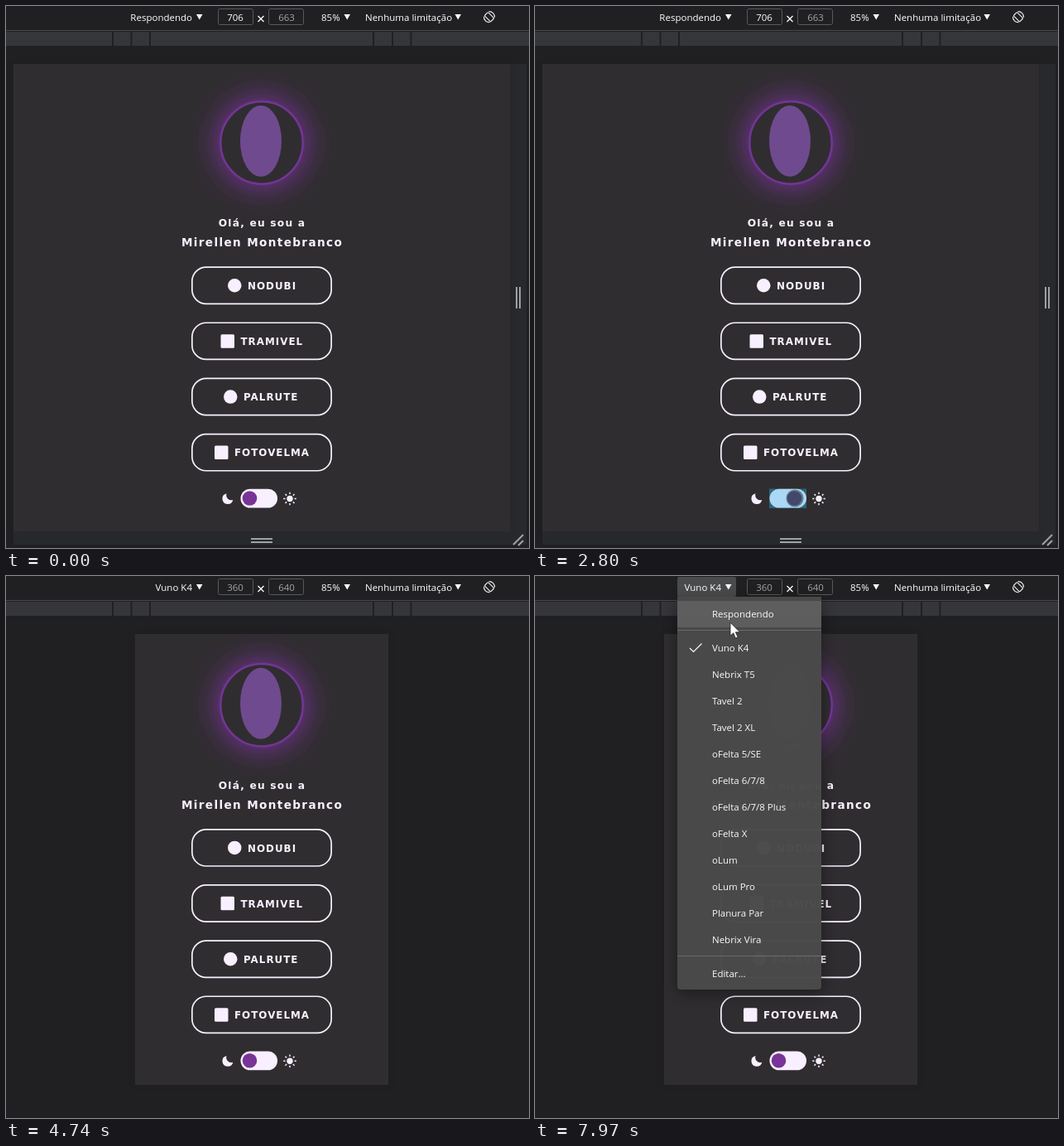
Write an HTML page that moves like this. It is 632 px wide and 654 px high and loops after 8 s.

```html
<!DOCTYPE html>
<html lang="pt">
<head>
<meta charset="utf-8">
<style>
  html, body { margin: 0; width: 100%; height: 100%; overflow: hidden; background: #202022; }
  svg { display: block; width: 100%; height: 100%; }
  .ui { font: 11.5px "Open Sans", sans-serif; fill: #fff; }
  .page { font: bold 12px "DejaVu Sans", sans-serif; fill: currentColor; }
  .mid { text-anchor: middle; }
  .field { fill: #202022; stroke: #58595c; }
  .grip { stroke: #a0a1a3; stroke-width: 2; fill: none; }
  #menuBox { filter: drop-shadow(0 5px 9px rgba(0, 0, 0, .4)); }
</style>
</head>
<body>
<svg viewBox="0 0 632 654">
  <defs>
    <filter id="blur" x="-100%" y="-100%" width="300%" height="300%"><feGaussianBlur stdDeviation="17"/></filter>
    <filter id="soft" x="-30%" y="-30%" width="160%" height="160%"><feGaussianBlur stdDeviation="7"/></filter>
    <clipPath id="view"><rect class="viewport" y="70"/></clipPath>
  </defs>

  <rect width="632" height="654" fill="#202022"/>
  <path d="M0 29.500H632" stroke="#48494c"/>
  <rect y="31" width="632" height="17" fill="#35363a"/>
  <path d="M129 31v17M151.500 31v17M174 31v17M444 31v17M467 31v17M489.500 31v17" stroke="#202022" stroke-width="2"/>

  <g id="resizers">
    <path d="M609 70h20v580H9v-16h600z" fill="#28292c"/>
    <path class="grip" d="M617 339v26M621 339v26M296 643h26M296 647h26M613 650l12-12M619 651l6-6"/>
  </g>
  <rect class="viewport" y="70" fill="#000" opacity=".06" filter="url(#soft)"/>

  <g id="page" clip-path="url(#view)">
    <rect class="viewport" y="70" fill="var(--bg)"/>
    <g id="content">
      <circle cx="309" cy="165" r="53" fill="#7a339e" filter="url(#blur)"/>
      <circle cx="309" cy="165" r="49.700" fill="var(--bg)" stroke="#733596" stroke-width="2.500"/>
      <ellipse cx="308" cy="163" rx="25" ry="43" fill="#6f4a8f"/>
      <text class="page mid" x="309.500" y="266" style="font-size:12.24px;letter-spacing:1.2px">Olá, eu sou a</text>
      <text class="page mid" x="309.500" y="290" style="font-size:13.6px;letter-spacing:1.36px">Mirellen Montebranco</text>
      <g id="links"></g>
      <path d="M266.500 588.200a6.500 6.500 0 1 0 7.800 7.800a6.200 6.200 0 0 1-7.800-7.800z" fill="currentColor"/>
      <circle cx="343" cy="594.500" r="3.700" fill="currentColor"/>
      <g id="rays" stroke="currentColor" stroke-width="1.500"></g>
      <rect x="283.500" y="582.700" width="44.500" height="22.900" rx="11.400" fill="currentColor"/>
      <circle id="knob" cy="594" r="8.800" fill="#783496"/>
      <rect id="tap" x="283" y="582.500" width="45" height="23.500" fill="rgba(51,181,229,.4)"/>
    </g>
  </g>

  <g class="ui">
    <rect id="hover" y="1" height="24" rx="2" fill="#4a4b4d"/>
    <text id="device" x="225" y="18" text-anchor="end"></text>
    <rect class="field" x="256.500" y="3.500" width="42" height="19" rx="2"/>
    <rect class="field" x="317.500" y="3.500" width="42" height="19" rx="2"/>
    <text id="wide" class="mid" x="277" y="18"></text>
    <text id="high" class="mid" x="339" y="18"></text>
    <path d="M304.500 12l7 7M311.500 12l-7 7" stroke="#fff" stroke-width="1.300"/>
    <text x="381" y="18">85%</text>
    <text x="434" y="18">Nenhuma limitação</text>
    <path d="M230 10h7.500l-3.750 6.500zM408.500 10h7.500l-3.750 6.500zM542.500 10h7.500l-3.750 6.500z"/>
    <g fill="none" stroke="#e8eaed" stroke-width="1.200">
      <rect x="581" y="8" width="6" height="10.500" rx="1" transform="rotate(-45 584 13.250)"/>
      <path d="M583.500 6.700a6.500 6.500 0 0 1 7 7M584.500 19.700a6.500 6.500 0 0 1-7-7"/>
    </g>
  </g>

  <g id="menu" class="ui">
    <path id="menuBox" d="M0 25h174v470a4 4 0 0 1-4 4H4a4 4 0 0 1-4-4z" fill="#4a4a4a"/>
    <rect id="row" width="174" height="32" fill="#5f5f5f"/>
    <path d="M0 65.500h174M0 458.500h174" stroke="#6c6c6c"/>
    <path id="check" d="M15 0l4.500 4.500l10-10" fill="none" stroke="#fff" stroke-width="1.200"/>
    <g id="items"></g>
  </g>

  <g id="cursor">
    <circle id="touch" r="10.500" fill="rgba(48,45,48,.55)"/>
    <path id="arrow" d="M0 0v16l3.700-3.400l2.700 6.200l2.700-1.200l-2.700-6h5.200z" fill="#fff" stroke="#222" stroke-width=".8"/>
    <path id="hand" transform="scale(1.1)" d="M-2 1.500q2-3 4 0v7q1.500-1 3 .4q1.800-.8 2.800.8q2.400-.4 2.400 2v5l-2 4.500h-8.500l-5.500-7q0-2.500 2-2l1.800 2z" fill="#fff" stroke="#222" stroke-width=".8"/>
  </g>
</svg>
<script>
const $ = id => document.getElementById(id);
const set = (el, attrs) => { for (const k in attrs) el.setAttribute(k, attrs[k]); };
const show = (el, on) => { el.style.display = on ? '' : 'none'; };

// Buttons: label, label start, round icon
const links = [['NODUBI', 292, true], ['TRAMIVEL', 283.5, false], ['PALRUTE', 287, true], ['FOTOVELMA', 276, false]];
$('links').innerHTML = links.map(([label, x, round], i) => `
  <g transform="translate(0 ${i * 67.15})">
    <rect x="224.850" y="315.100" width="168.300" height="44.200" rx="17" fill="none" stroke="currentColor" stroke-width="1.700"/>
    <rect x="${x - 24}" y="329" width="16.500" height="16.500" rx="${round ? 8.25 : 1.5}" fill="currentColor"/>
    <text class="page" x="${x}" y="342" style="font-size:11.9px;letter-spacing:1px">${label}</text>
  </g>`).join('');

$('rays').innerHTML = Array.from({ length: 8 }, (_, i) =>
  `<path d="M343 589v-2.300" transform="rotate(${i * 45} 343 594.500)"/>`).join('');

const phone = 'Vuno K4';
const devices = [phone, 'Nebrix T5', 'Tavel 2', 'Tavel 2 XL', 'oFelta 5/SE', 'oFelta 6/7/8', 'oFelta 6/7/8 Plus',
  'oFelta X', 'oLum', 'oLum Pro', 'Planura Par', 'Nebrix Vira'];
const item = (label, y) => `<text x="42" y="${y + 4}">${label}</text>`;
$('items').innerHTML = item('Respondendo', 46) + devices.map((d, i) => item(d, 87 + 32 * i)).join('') + item('Editar...', 480);

const LOOP = 8000, PICK = 4560;
// Keyframes: time, then eased values
const pointerPath = [
  [0, 650, 690], [70, 602, 652], [860, 326, 228], [910, 326, 228], [1660, 306, 574], [2060, 306, 588], [2140, 306, 588],
  [2460, 314, 594], [2830, 314, 594], [3450, 205, 16], [3520, 205, 16], [3900, 228, 16], [4050, 228, 16],
  [4260, 233, 59], [4330, 233, 62], [4500, 232, 87], [4580, 232, 87], [4810, 430, 85], [5140, 430, 85],
  [5640, 229, 16], [5810, 229, 18], [6080, 229, 18], [6300, 231, 75], [7250, 231, 75], [7640, 232, 17],
  [7830, 232, 17], [7960, 236, 56], [8000, 236, 57]];
const knobPath = [[0, 294.5], [2110, 294.5], [2400, 313.5], [2800, 313.5], [3090, 294.5]];
const scrollPath = [[0, 0], [6400, 0], [6650, 9], [6950, 9], [7250, 0]];
const menuPath = [[0, 0], [4030, 0], [4180, 1], [PICK, 1], [PICK + 90, 0], [7835, 0], [7985, 1]];

function sample(path, t) {
  const next = path.findIndex(p => p[0] > t);
  if (next < 0) return path[path.length - 1].slice(1);
  const a = path[next - 1], b = path[next];
  const u = (t - a[0]) / (b[0] - a[0]), e = u * u * (3 - 2 * u);
  return a.slice(1).map((v, i) => v + (b[i + 1] - v) * e);
}

function draw(t) {
  const mobile = t >= PICK, light = t >= 2110 && t < 2790;
  const left = mobile ? 156 : 9, width = mobile ? 306 : 600, height = mobile ? 544 : 564;
  document.querySelectorAll('.viewport').forEach(el => set(el, { x: left, width, height }));
  show($('resizers'), !mobile);

  $('page').style.color = light ? '#302d30' : '#f9f0ff';
  $('page').style.setProperty('--bg', light ? '#f9f0ff' : '#302d30');
  const [scroll] = sample(scrollPath, t);
  set($('content'), { transform: `translate(0 ${(mobile ? -9.3 : 0) - scroll})` });
  set($('knob'), { cx: sample(knobPath, t)[0] });
  show($('tap'), (t >= 2060 && t < 2200) || (t >= 2740 && t < 2870));

  const [x, y] = sample(pointerPath, t);
  const [opacity] = sample(menuPath, t);
  const buttonX = mobile ? 172 : 145;
  const overButton = x >= buttonX && x <= 243 && y >= 1 && y <= 25;
  show($('hover'), overButton || opacity > 0);
  set($('hover'), { x: buttonX, width: 243 - buttonX });
  $('device').textContent = mobile ? phone : 'Respondendo';
  $('wide').textContent = mobile ? 360 : 706;
  $('high').textContent = mobile ? 640 : 663;
  set($('wide'), { fill: mobile ? '#a4a5a8' : '#fff' });
  set($('high'), { fill: '#a4a5a8' });

  show($('menu'), opacity > 0);
  set($('menu'), { transform: `translate(${t < 6000 ? 145 : 172} 0)`, opacity });
  show($('row'), y > 29);
  set($('row'), { y: y < 68 ? 30 : 71 });
  set($('check'), { transform: `translate(0 ${t < 6000 ? 46 : 87})` });

  const inPage = opacity === 0 && x > left && x < left + width && y > 70 && y < 70 + height;
  const hand = overButton && opacity === 0;
  set($('cursor'), { transform: `translate(${x} ${y})` });
  show($('touch'), inPage);
  show($('hand'), hand);
  show($('arrow'), !inPage && !hand);
}

function tick() {
  draw(performance.now() % LOOP);
  requestAnimationFrame(tick);
}
tick();
</script>
</body>
</html>
```
